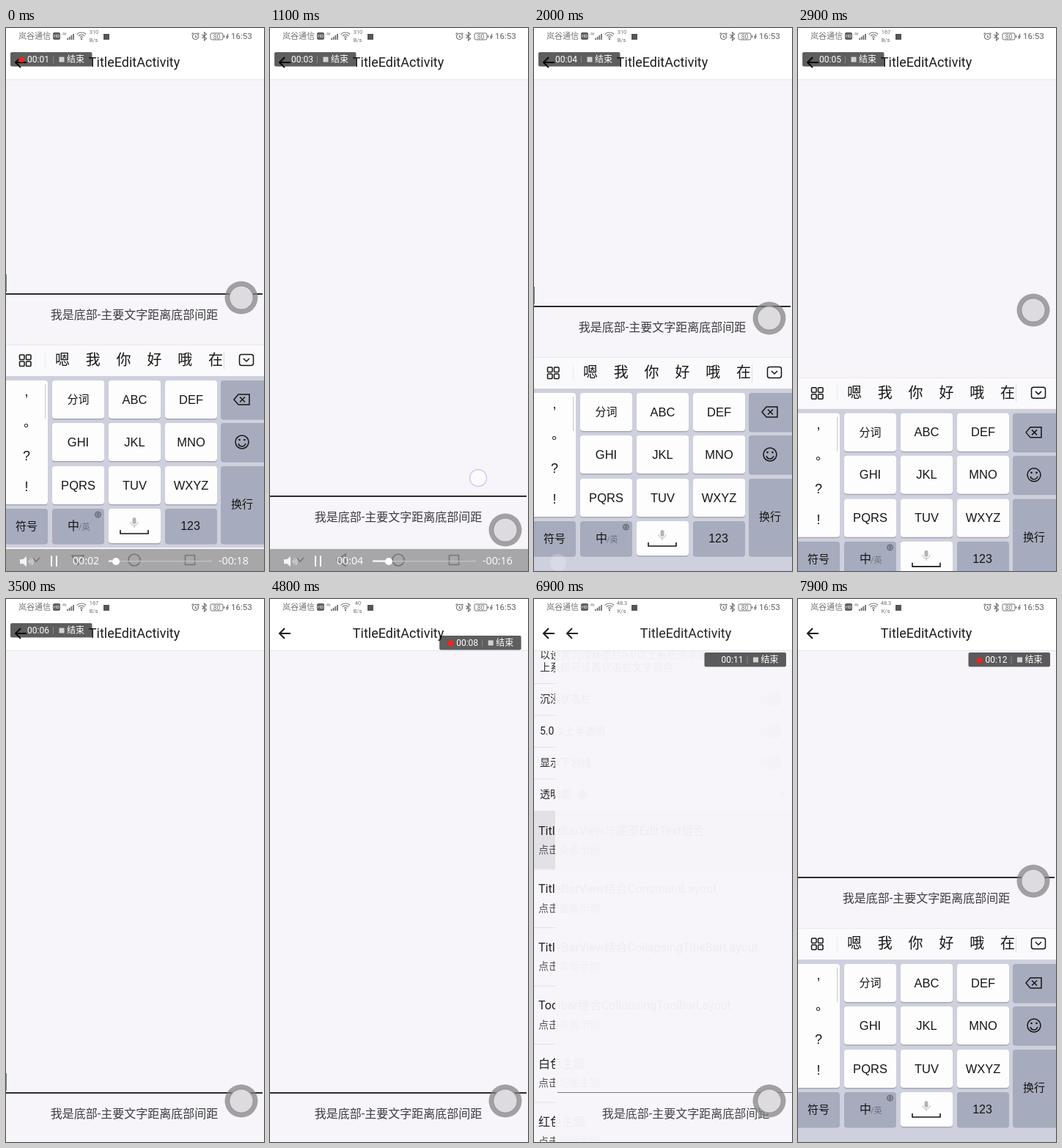
An HTML page with a canvas for the animation above (8 s loop, 352 by 741 pixels).

```html
<!DOCTYPE html>
<html lang="zh">
<head>
<meta charset="utf-8">
<style>
html, body { margin: 0; width: 352px; height: 741px; overflow: hidden; background: #fff; }
canvas { display: block; }
</style>
</head>
<body>
<canvas id="stage" width="352" height="741"></canvas>
<script>
const W = 352, H = 741, LOOP = 8000;
const g = document.getElementById('stage').getContext('2d');
const UI = 'Roboto, "Noto Sans CJK SC", "Noto Sans CJK", sans-serif';
const KEYS = '"Liberation Sans", "Noto Sans CJK SC", "Noto Sans CJK", sans-serif';
const clamp = v => Math.max(0, Math.min(1, v));
const span = (t, start, length) => clamp((t - start) / length);
const easeOut = u => 1 - (1 - u) ** 3;
const mix = (a, b, u) => a + (b - a) * u;
const two = n => String(Math.floor(n)).padStart(2, '0');

function text(s, x, y, size, color = '#222', align = 'left', family = UI) {
  g.font = `${size}px ${family}`;
  g.textAlign = align;
  g.textBaseline = 'middle';
  g.fillStyle = color;
  g.fillText(s, x, y);
}
function rect(x, y, w, h, color) {
  g.fillStyle = color;
  g.fillRect(x, y, w, h);
}
function round(x, y, w, h, r, color) {
  g.beginPath();
  g.roundRect(x, y, w, h, r);
  g.fillStyle = color;
  g.fill();
}
function disc(x, y, r, color) {
  g.beginPath();
  g.arc(x, y, r, 0, 7);
  g.fillStyle = color;
  g.fill();
}
function pen(color, width) {
  g.strokeStyle = color;
  g.lineWidth = width;
}
function ring(x, y, r, color, width, from = 0, to = 7) {
  pen(color, width);
  g.beginPath();
  g.arc(x, y, r, from, to);
  g.stroke();
}
function frame(x, y, w, h, r, color, width) {
  pen(color, width);
  g.beginPath();
  g.roundRect(x, y, w, h, r);
  g.stroke();
}
function path(d, color, width, x = 0, y = 0) {
  g.save();
  g.translate(x, y);
  pen(color, width);
  g.stroke(new Path2D(d));
  g.restore();
}

function statusBar(t) {
  const gray = '#707070';
  rect(0, 0, W, 24, '#fff');
  text('岚谷通信', 17, 12, 11, gray);
  round(64, 6, 10, 10, 2, '#606060');
  text('HD', 69, 11.5, 6, '#fff', 'center');
  text('46', 77, 8.5, 5, gray);
  for (let i = 0; i < 4; i++) rect(83 + i * 2.7, 14 - i * 2, 1.8, 2 + i * 2, gray);
  for (const r of [3, 6, 9]) ring(103, 15, r, gray, 1.2, -2.35, -0.8);
  disc(103, 15, 1.2, gray);
  const [rate, unit] = t < 2300 ? ['310', 'B/s'] : t < 4200 ? ['167', 'B/s'] :
    t < 6200 ? ['40', 'B/s'] : ['48.3', 'K/s'];
  text(rate, 120, 6, 7.5, gray, 'center');
  text(unit, 119.5, 16.5, 7.5, gray, 'center');
  rect(133, 8, 8, 8, '#555');
  ring(258.5, 11.5, 4, gray, 1.2);
  path('M0-2V1H2 M-5-3L-3-5 M5-3L3-5', gray, 1.1, 258.5, 11.5);
  path('M-3-2.5L3 3L0 5.5V-5.5L3-3L-3 2.5', gray, 1.1, 270.5, 11.5);
  frame(279, 7, 17, 9, 2, gray, 1);
  rect(297, 10, 1.2, 3, gray);
  text('80', 287.5, 12, 8.5, gray, 'center');
  path('M1-3.5L-1 .5H1L-1 3.5', gray, 1.3, 302, 11.5);
  text('16:53', 307, 12, 11.5, '#606060');
}

function header(title) {
  rect(0, 24, W, 46, '#fff');
  rect(0, 70, W, 1, '#e6e4e8');
  path('M28 47H13 M20 40L13 47L20 54', '#1c1c1c', 2);
  if (title) text(title, W / 2 - 1, 48, 18, '#1c1c1c', 'center');
}

function editPage(t, bottom) {
  rect(0, 24, W, H, '#f7f5fa');
  header('TitleEditActivity');
  const line = bottom - 70;
  const focused = t < 6400 || t > 7350;
  rect(0, line, 350, focused ? 2 : 1, focused ? '#2d2b30' : '#77757a');
  text('我是底部-主要文字距离底部间距', 175, line + 30.5, 16, '#3c3b40', 'center');
  if (t < 5500 && (t - 1900 + 735 * 3) % 735 < 365) rect(0, line - 26, 1, 24, '#777');
}

function listPage(pressed) {
  rect(0, 24, W, H, '#f7f5fa');
  text('以设置沉浸状态栏5.0以上系统效果更佳', 8, 77, 14, '#333');
  text('上系统可设置状态栏文字颜色', 8, 94, 14, '#333');
  ['沉浸状态栏', '5.0以上半透明', '显示下划线', '透明度'].forEach((label, i) => {
    const y = 137 + i * 43.4;
    rect(0, y - 22, W, 1, '#e1dfe4');
    text(label, 8, y, 14, '#222');
    if (i < 3) {
      round(308, y - 6, 28, 12, 6, '#d2d0d6');
      disc(328, y, 10, '#bcbac0');
    }
  });
  rect(66, 267, 250, 1.5, '#c4c2c8');
  disc(66, 267, 6, '#777');
  text('0', 334, 267, 13, '#444');
  const items = ['TitleBarView与底部EditText组合', 'TitleBarView结合ConstraintLayout',
    'TitleBarView结合CollapsingTitleBarLayout', 'Toolbar结合CollapsingToolbarLayout',
    '白色主题', '红色主题'];
  items.forEach((label, i) => {
    const y = 289 + i * 79.5;
    if (!i && pressed) rect(0, y, W, 79, '#e3e1e5');
    rect(0, y, W, 1, '#e1dfe4');
    text(label, 6, y + 28, 16, '#222');
    text(i < 4 ? '点击查看示例' : '点击切换主题', 6, y + 54, 14, '#555');
  });
  header('');
}

const keyRows = [498, 556, 615, 673];
const keyCols = [63, 140, 217];
const letters = ['分词', 'ABC', 'DEF', 'GHI', 'JKL', 'MNO', 'PQRS', 'TUV', 'WXYZ'];

function key(x, y, w, h, dark) {
  round(x, y + 1.5, w, h, 4, '#a4a8b8');
  round(x, y, w, h, 4, dark ? '#a6acbd' : '#fdfdfe');
}

// Drawn in the coordinates of the keyboard resting at y = 449.
function keyboard(top) {
  const ink = '#151515';
  g.save();
  g.translate(0, top - 449);
  rect(0, 449, W, 43, '#fafafc');
  rect(0, 449, W, 1, '#e9e8ed');
  rect(0, 492, W, 320, '#ced0dd');
  for (const x of [18.5, 27.5]) for (const y of [463, 472]) frame(x, y, 6.5, 6.5, 1, ink, 1.5);
  rect(53, 460, 1, 20, '#ececf0');
  rect(297, 459, 1, 24, '#dedee3');
  [...'嗯我你好哦在'].forEach((c, i) => text(c, 77 + i * 41.8, 471, 20, ink, 'center'));
  frame(318.5, 462.5, 19, 15, 3, ink, 1.5);
  path('M-4-2L0 2L4-2', ink, 1.5, 328, 470);

  key(-4, 498, 61, 169);
  rect(53, 503, 1, 47, '#c9c9ce');
  [...',。?!'].forEach((c, i) => text(c, c === '。' ? 33 : 28, [514, 556, 602, 644][i], 18, ink, 'center', KEYS));
  letters.forEach((label, i) => {
    const x = keyCols[i % 3], y = keyRows[Math.floor(i / 3)];
    key(x, y, 71, 52);
    text(label, x + 35.5, y + 27, i ? 16.5 : 15, ink, 'center', KEYS);
  });
  key(293, 498, 63, 52, true);
  key(293, 556, 63, 52, true);
  key(293, 615, 63, 105, true);
  path('M-11 0L-5-7H10V7H-5Z M-3-3.5L4 3.5M4-3.5L-3 3.5', ink, 1.5, 322, 524);
  ring(322, 582, 9, ink, 1.5);
  ring(322, 583, 5, ink, 1.4, 0.2, 2.94);
  disc(318.5, 579, 1.3, ink);
  disc(325.5, 579, 1.3, ink);
  text('换行', 322, 668, 15, ink, 'center');

  key(-4, 673, 61, 47, true);
  key(63, 673, 71, 47, true);
  key(140, 673, 71, 47);
  key(217, 673, 71, 47, true);
  text('符号', 28, 698, 15, ink, 'center');
  text('中', 84, 697, 16, ink);
  text('/英', 99, 699, 11, '#6c7180');
  ring(125.5, 681, 4, '#5d6270', 1);
  path('M-4 0H4M0-4V4M-3-2.5Q0 0 3-2.5M-3 2.5Q0 0 3 2.5', '#5d6270', 0.8, 125.5, 681);
  round(172.5, 685, 5, 9, 2.5, '#b4b4b8');
  ring(175, 691, 5, '#b4b4b8', 1, 0, 3.14);
  rect(174.5, 696, 1, 3, '#b4b4b8');
  path('M156 702V707H194V702', ink, 1.6);
  text('123', 251.5, 698, 16, ink, 'center', KEYS);
  g.restore();
}

function navBar(keyboardShown) {
  const ink = '#77777a';
  rect(0, 709, W, 32, '#f4f3f6');
  path('M-5-3L0 2L5-3', ink, 1.6, 41, 726);
  path(keyboardShown ? 'M-8-6H8L0 6Z' : 'M5-8V8L-7 0Z', ink, 1.6, 98, 726);
  ring(175, 726, 8, ink, 1.6);
  frame(244.5, 719.5, 13, 13, 0.5, ink, 1.6);
}

function player(t) {
  const alpha = 1 - span(t, 1450, 250);
  if (!alpha) return;
  const elapsed = 2.5 + t * 0.0014, thumb = 150 + t * 0.0109;
  g.globalAlpha = alpha;
  rect(0, 711, W, 30, 'rgba(118,118,120,.6)');
  g.fillStyle = '#f4f4f4';
  g.fill(new Path2D('M19 725H23L28 721V735L23 731H19Z'));
  for (const r of [3, 5.5, 8]) ring(29, 728, r, '#f0f0f0', 1, -0.7, 0.7);
  rect(61, 720, 2, 15, '#fff');
  rect(68, 720, 2, 15, '#fff');
  const family = '"Open Sans", sans-serif';
  text('00:' + two(elapsed), 91, 728, 14.2, '#fff', 'left', family);
  text('-00:' + two(20.9 - elapsed), 290, 728, 14.2, '#fff', 'left', family);
  rect(140, 727, 141, 1.2, '#c4c4c4');
  rect(140, 726.5, thumb - 140, 2, '#fff');
  disc(thumb, 728, 5, '#fff');
  g.globalAlpha = 1;
}

function badge(t) {
  const x = t < 4600 ? mix(6, 211, span(t, 4050, 400)) : mix(211, 232.5, easeOut(span(t, 4650, 250)));
  const y = t > 6100 ? 73 : mix(33, 51, span(t, 4050, 800));
  round(x, y, 111.5, 19.5, 2, 'rgba(0,0,0,.63)');
  const blink = (t / 800) % 1;
  if (blink >= 0.7 || blink < 0.1) disc(x + 15, y + 10, 4, '#f0261c');
  text('00:' + two(1.6 + t * 0.0014), x + 23, y + 10.5, 12, '#fff');
  rect(x + 58, y + 5, 1, 10, '#858585');
  rect(x + 66.5, y + 6.5, 7, 7, '#d2d2d2');
  text('结束', x + 77, y + 10.5, 12, '#fff');
}

function ball(y) {
  disc(321, y, 22.5, 'rgba(128,128,130,.72)');
  disc(321, y, 16.8, '#98979b');
  disc(321, y, 15.6, '#dddbdf');
}

function ballY(t) {
  if (t < 1400) return mix(368, 685, easeOut(span(t, 450, 400)));
  if (t < 2700) return mix(685, 385, easeOut(span(t, 1500, 750)));
  if (t < 7000) return mix(385, 685, easeOut(span(t, 3000, 400)));
  return mix(685, 385, easeOut(span(t, 7420, 480)));
}

// 1 when the keyboard is fully up.
function keyboardLift(t) {
  if (t < 1300) return 1 - span(t, 380, 220);
  if (t < 2700) return easeOut(span(t, 1350, 250));
  if (t < 7000) return 1 - span(t, 2880, 220);
  return easeOut(span(t, 7350, 300));
}

const touches = [
  { x: 98, y: 726, from: 150, to: 400 },
  { x: 284, y: 614, from: 1050, to: 1300 },
  { x: 33, y: 730, from: 1750, to: 2060 },
  { x: 14, y: 36, from: 5700, to: 5950 },
  { x: 150, y: 330, from: 6500, to: 6720 }
];

function touch({ x, y, from, to }, t) {
  if (t < from || t > to) return;
  g.globalAlpha = Math.min(1, (to - t) / 150);
  disc(x, y, 11.5, 'rgba(255,255,255,.55)');
  ring(x, y, 11.5, '#d2caec', 1.5);
  g.globalAlpha = 1;
}

function draw(t) {
  const nav = t < 1850;
  const lift = keyboardLift(t);
  const opening = t > 1300 && t < 2700 || t > 7000;
  const resized = opening ? lift > 0.75 : lift > 0.98;
  const bottom = resized ? (nav ? 432 : 449) : nav ? 708 : 743;
  const away = t < 6500 ? span(t, 6000, 364) ** 2 : 1 - easeOut(span(t, 6700, 364));

  rect(0, 0, W, H, '#fff');
  if (away > 0) listPage(t > 6550);
  if (away < 1) {
    const x = Math.round(W * away);
    g.save();
    g.translate(x, 0);
    g.beginPath();
    g.rect(x ? -3 : 0, 0, W + 3, H);
    g.clip();
    if (x) {
      rect(-3, 24, 3, 46, '#fff');
      rect(-3, 70, 3, H, '#f7f5fa');
      g.globalAlpha = 0.96;
    }
    editPage(t, bottom);
    g.restore();
  }
  statusBar(t);
  if (lift > 0) keyboard(mix(H, nav ? 432 : 449, lift));
  if (nav) {
    navBar(lift > 0.5);
    player(t);
  }
  badge(t);
  ball(ballY(t));
  touches.forEach(p => touch(p, t));
}

function tick() {
  draw(performance.now() % LOOP);
  requestAnimationFrame(tick);
}
tick();
</script>
</body>
</html>
```
